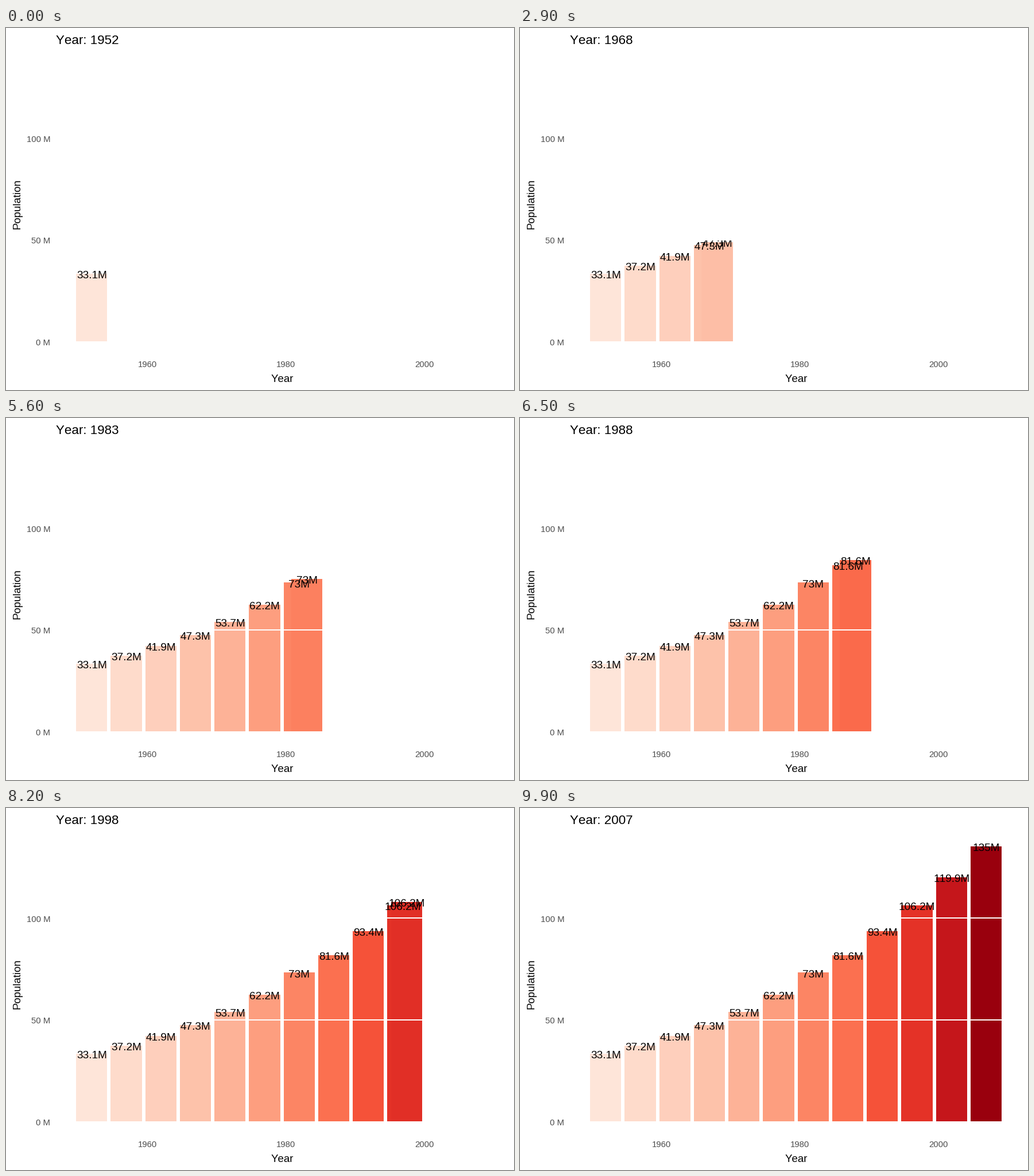
These frames come from a looping animation (885 by 632 pixels, 10 s). A matplotlib script:

```python
import numpy as np
import matplotlib.pyplot as plt
from matplotlib.animation import FuncAnimation
from matplotlib.patches import Rectangle

W, H, DPI = 885, 632, 96
FRAMES, INTERVAL = 100, 100
PT = 72 / DPI

plt.rcParams["font.family"] = "Liberation Sans"
plt.rcParams["text.kerning_factor"] = 6  # practically no kerning

years = np.arange(1952, 2008, 5)
pop = np.array([33.119096, 37.173340, 41.871351, 47.287752, 53.740085, 62.209173,
                73.039376, 81.551520, 93.364244, 106.207839, 119.901274, 135.031164])
REDS = ["fee5d9", "fcbba1", "fc9272", "fb6a4a", "ef3b2c", "cb181d", "99000d"]

# CIE Lab conversion (D65), used for the perceptual colour ramp
RGB_XYZ = np.array([[0.4124564, 0.3575761, 0.1804375],
                    [0.2126729, 0.7151522, 0.0721750],
                    [0.0193339, 0.1191920, 0.9503041]])
WHITE = RGB_XYZ.sum(axis=1)
XYZ_LAB = np.array([[0, 116, 0], [500, -500, 0], [0, 200, -200]])


def hex_to_lab(code):
    c = np.array([int(code[k:k + 2], 16) for k in (0, 2, 4)]) / 255
    c = np.where(c > 0.04045, ((c + 0.055) / 1.055) ** 2.4, c / 12.92)
    t = RGB_XYZ @ c / WHITE
    f = np.where(t > 0.008856, np.cbrt(t), 7.787 * t + 16 / 116)
    return XYZ_LAB @ f - [16, 0, 0]


def lab_to_rgb(lab):
    fy = (lab[0] + 16) / 116
    f = np.array([fy + lab[1] / 500, fy, fy - lab[2] / 200])
    t = np.where(f > 0.206893, f ** 3, (f - 16 / 116) / 7.787)
    c = np.clip(np.linalg.solve(RGB_XYZ, t * WHITE), 0, 1)
    c = np.where(c > 0.0031308, 1.055 * c ** (1 / 2.4) - 0.055, 12.92 * c)
    return np.clip(c, 0, 1)


stops = np.array([hex_to_lab(code) for code in REDS])
level = (pop - pop[0]) / (pop[-1] - pop[0])
labs = np.array([[np.interp(v, np.linspace(0, 1, len(REDS)), stops[:, k]) for k in range(3)]
                 for v in level])
names = [f"{round(v, 1):g}M" for v in pop]


def px(year):
    return 149.75 + 12.05 * (year - 1952)


def py(millions):
    return 547.4 - 3.553 * millions


fig = plt.figure(figsize=(W / DPI, H / DPI), dpi=DPI, facecolor="white")
ax = fig.add_axes([0, 0, 1, 1])
ax.set_xlim(0, W)
ax.set_ylim(H, 0)
ax.axis("off")


def write(x, y, text, size, color="black", ha="center", **kw):
    return ax.text(x, y, text, fontsize=size * PT, color=color, ha=ha,
                   va="baseline", **kw)


class Bar:
    """A column on whole pixels with its value label."""

    def __init__(self, order):
        self.rect = ax.add_patch(Rectangle((0, 0), 1, 1, lw=0, antialiased=False,
                                           zorder=1 + order / 100))
        self.label = write(0, 0, "", 18.97, zorder=2)

    def place(self, year, value, lab, name):
        left, right = int(px(year - 2.25)), int(px(year + 2.25))
        top = int(py(value))
        self.rect.set_bounds(left, top, right - left, 547 - top)
        self.rect.set_facecolor(lab_to_rgb(lab))
        self.label.set_position((px(year) - 0.4, round(py(value) + 7.7)))
        self.label.set_text(name)

    def show(self, on):
        self.rect.set_visible(on)
        self.label.set_visible(on)


bars = [Bar(k) for k in range(len(years))]
for bar, *row in zip(bars, years, pop, labs, names):
    bar.place(*row)
mover = Bar(len(years))

# Grid lines lie on top of the columns
for value, base in ((0, 554), (50, 376), (100, 199)):
    line_y = round(py(value) + 0.2)
    ax.add_patch(Rectangle((87, line_y - 1), 789, 2, lw=0, color="white",
                           antialiased=False, zorder=3))
    write(77.3, base, f"{value} M", 14.93, "#4d4d4d", "right")
for year in (1960, 1980, 2000):
    write(px(year) + 0.4, 592, str(year), 14.93, "#4d4d4d")

write(480.8, 618, "Year", 18.67)
write(24.5, 307.6, "Population", 18.67, rotation=90, rotation_mode="anchor")
title = write(86.6, 28, "", 22.4, ha="left")


def update(i):
    pos = i * (len(years) - 1) / (FRAMES - 1)
    k = int(pos + 1e-9)
    t = pos - k
    for n, bar in enumerate(bars):
        bar.show(n <= k)
    moving = t > 1e-6
    mover.show(moving)
    if moving:
        def mix(a):
            return a[k] + (a[k + 1] - a[k]) * t
        mover.place(mix(years), mix(pop), mix(labs), names[k + (t >= 0.5)])
    title.set_text(f"Year: {round(1952 + 5 * pos)}")
    return []


anim = FuncAnimation(fig, update, frames=FRAMES, interval=INTERVAL,
                     init_func=lambda: update(0), repeat=True, repeat_delay=0)
plt.show()
```
